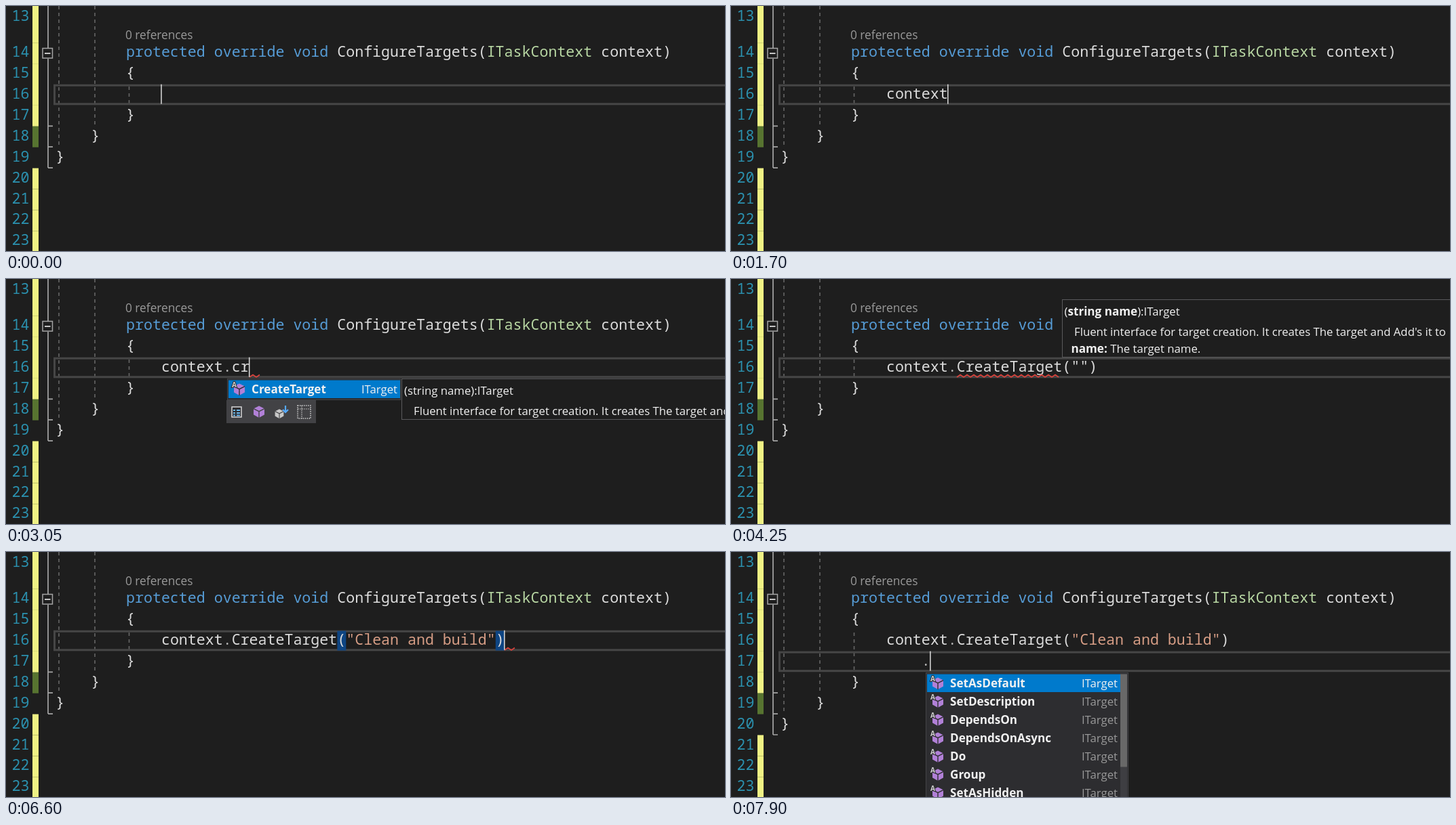
These frames come from a looping animation (1060x362 px, 8000 ms). An HTML page:

```html
<!DOCTYPE html>
<html lang="en">
<head>
<meta charset="utf-8">
<title>Editor typing</title>
<style>
html, body { margin: 0; width: 100%; height: 100%; overflow: hidden; background: #1e1e1e; }
svg { display: block; }
text { white-space: pre; }
.code { font: 21.62px "Noto Sans Mono", monospace; fill: #dcdcdc; }
.ui { font: 16.75px "Open Sans", sans-serif; fill: #f1f1f1; }
.bold { font-weight: 700; font-size: 17.1px; }
.lens { font-size: 17.3px; fill: #999; }
</style>
</head>
<body>
<svg id="stage" width="1060" height="362" viewBox="0 0 1060 362"></svg>
<script>
const LOOP = 8000, PITCH = 30.9, CHAR = 12.97, COL0 = 73.3;
const stage = document.getElementById('stage');

const colX = c => COL0 + c * CHAR;
const rowY = n => n < 14 ? 0 : 116 + (n - 16) * PITCH;
const baseY = n => n < 14 ? 22 : 75.2 + (n - 14) * PITCH;
const esc = s => s.replace(/&/g, '&amp;').replace(/</g, '&lt;').replace(/>/g, '&gt;');
const rect = (x, y, w, h, fill, more = '') =>
  `<rect x="${x}" y="${y}" width="${w}" height="${h}" fill="${fill}" ${more}/>`;
const path = (d, stroke, w = 1.5, more = 'fill="none"') =>
  `<path d="${d}" stroke="${stroke}" stroke-width="${w}" ${more}/>`;
const shape = (d, fill) => `<path d="${d}" fill="${fill}"/>`;
const span = (s, fill) => `<tspan fill="${fill}">${esc(s)}</tspan>`;
const label = (x, y, cls, inner, more = '') =>
  `<text x="${x}" y="${y}" class="${cls}" ${more}>${inner}</text>`;
const ui = (x, y, s, bold) => label(x, y, bold ? 'ui bold' : 'ui', esc(s));
const code = (col, row, inner) => label(colX(col), baseY(row), 'code', inner);
const at = (x, y, inner) => `<g transform="translate(${x} ${y})">${inner}</g>`;

// Completion icons, centred on 0,0
const cube = (c = '#b180d7', gap = '#2d2d30') =>
  shape('M0-8.5L8-4.5V4.5L0 9L-8 4.5V-4.5Z', c) +
  path('M-8-4.3L0-.3L8-4.3M0 0V9', gap, 1.4);
const capA = '<text x="-11" y="-2" font-family="Open Sans, sans-serif" font-size="10" ' +
  'font-weight="700" fill="#d0d0d0" stroke="#2d2d30" stroke-width="2" paint-order="stroke">A</text>';
const page = rect(-7, -7, 14, 15, '#2d2d30', 'stroke="#d8d8d8" stroke-width="1.5"') +
  path('M-5-2H-2M0-2H5M-5 2H-2M0 2H5M-5 5.5H-2M0 5.5H5', '#6cb8f0', 2);
const classMark = path('M-4-3H4M0-3V5H4', '#c5c5c5') +
  shape('M-10-3L-4-9L1-5L-5 2ZM2-3L6-7L10-3L6 1ZM2 5L6 1L10 5L6 9Z', '#e8ab53');
const key = c => `<circle cx="-4" r="3" fill="none" stroke="${c}" stroke-width="2"/>` +
  path('M-1 0H7V3M4 0V3', c, 2);
const icons = {
  method: () => at(0, 1, cube()) + capA,
  prop: () => at(1, 0, page) + path('M2-7H8M5-10L8-7L5-4', '#8fce8f', 1.8) + capA,
  guarded: () => at(1, -1, cube()) +
    '<circle cx="-7" cy="4" r="2.6" fill="#2d2d30" stroke="#d0d0d0" stroke-width="1.5"/>' +
    path('M-7 6.5V11H-4', '#d0d0d0'),
  param: () => path('M-7-8Q-13 0-7 8M7-8Q13 0 7 8', '#f1f1f1', 2) +
    `<g transform="scale(.62)">${cube('#e0e0e0', '#333')}</g>`,
  keyword: () => '<circle r="10" fill="#c8c8c8"/>' + key('#2d2d30'),
  class: () => classMark,
  seen: () => classMark + rect(5, 5, 5, 5, '#d0d0d0'),
  delegate: () => rect(-8, -4, 16, 11, '#b180d7') +
    path('M-3-4V-7H3V-4', '#b180d7', 2) + path('M-8 1H8', '#2d2d30', 1.4)
};

// Lists: rows are [icon, name, type, bold]
const m = (name, type) => ['method', name, type, 1];
const LISTS = {
  start: { x: 222, r: 631, y: 147, thumb: 28, rows: [
    ['param', 'context', 'ITaskContext'], ['keyword', 'const', '', 1],
    ['guarded', 'ConfigureBuildProperties', 'void', 1], ['guarded', 'ConfigureTargets', 'void', 1],
    ['class', 'CommandArguments', ''], ['delegate', 'Comparison<>', ''],
    ['seen', 'Console', ''], ['class', 'ConsoleCancelEventArgs', '']] },
  members: { x: 327, r: 794, y: 147, thumb: 174, rows: [
    ['prop', 'Properties', 'IBuildPropertiesSession'],
    ['prop', 'ScriptArgs', 'DictionaryWithDefault<string,string>'],
    m('CreateTarget', 'ITarget'), m('Tasks', 'ITaskFluentInterface'),
    m('BuildSystems', 'IBuildSystem'), m('CoreTasks', 'ICoreTaskFluentInterface'),
    m('LogError', 'void'), m('LogInfo', 'void')] },
  some: { x: 327, r: 695, y: 147, rows: [m('CreateTarget', 'ITarget'),
    m('CoreTasks', 'ICoreTaskFluentInterface'), m('DecreaseDepth', 'void')] },
  one: { x: 327, r: 581, y: 147, rows: [m('CreateTarget', 'ITarget')] },
  target: { x: 288, r: 585, y: 178, thumb: 137, rows: ['SetAsDefault', 'SetDescription', 'DependsOn',
    'DependsOnAsync', 'Do', 'Group', 'SetAsHidden'].map(n => m(n, 'ITarget')) }
};

function popup(s) {
  const { x, r, y, thumb, rows } = LISTS[s.list];
  const h = thumb ? 230 : rows.length * 27 + 4;
  const end = thumb ? r - 11 : r;
  let out = rect(x - .5, y + .5, r - x + 1, h, '#2d2d30', 'stroke="#434346"');
  out += rect(x + 1, y + 2.5, end - x - 1, 26.5, '#007acc');
  if (thumb) out += rect(end, y + 2, 10, h, '#3e3e42') + rect(end, y + 2.5, 10, thumb, '#686868');
  rows.forEach(([icon, name, type, bold], i) => {
    const cy = y + 16 + i * 27;
    const n = i && /^c/i.test(name) ? s.match : 0;
    out += at(x + 17, cy - 1, icons[icon]());
    out += label(x + 35, cy + 6, bold ? 'ui bold' : 'ui', span(name.slice(0, n), '#b0a4f4') + esc(name.slice(n)));
    out += label(r - (thumb ? 15 : 4), cy + 6, 'ui', span(type, i ? '#999' : '#f1f1f1'), 'text-anchor="end"');
  });
  return thumb ? out : out + filterBar(y + h);
}

function filterBar(y) {
  const cy = y + 18;
  return rect(325, y + 1, 132, 34, '#424245') +
    at(340, cy, page) + at(373, cy, cube('#b180d7', '#424245')) +
    at(403, cy + 3, `<g transform="scale(.8)">${cube('#c8c8c8', '#424245')}</g>`) +
    path(`M412 ${cy - 9}V${cy + 1}M408 ${cy - 3}L412 ${cy + 1}L416 ${cy - 3}`, '#55aaff', 2.2) +
    rect(430, cy - 9, 19, 19, 'none', 'stroke="#d0d0d0" stroke-width="1.5" stroke-dasharray="1.5 1.5"') +
    path(`M430 ${cy - 4}H449M436 ${cy - 9}V${cy + 10}`, '#d0d0d0', 1.2, 'stroke-dasharray="1.5 1.5"');
}

const ABOUT = "Fluent interface for target creation. It creates The target and Add's it to";
const frame = (x, y, h) => rect(x + .5, y + .5, 600, h, '#1e1e1e', 'stroke="#5a5a5c"');
const tips = {
  item: () => frame(583, 147, 60) + ui(587, 171, '(string name):ITarget') + ui(601, 201, ABOUT),
  call: () => frame(488, 30, 85) +
    label(491.5, 54, 'ui', '(<tspan class="bold">string name</tspan>):ITarget') +
    ui(506, 84, ABOUT) +
    label(501.5, 109, 'ui', '<tspan class="bold">name:</tspan> The target name.')
};

function squiggle([x, end]) {
  let d = `M${x} 145`;
  for (let i = 1; x + i * 5 <= end; i++) d += `l5 ${i % 2 ? -3.5 : 3.5}`;
  return path(d, '#d8423c', 1.6, 'fill="none" stroke-linejoin="round"');
}

function margin(nl) {
  let out = '';
  for (let n = 13; n <= 23; n++) {
    const k = n - nl;
    const fill = k === 18 ? '#577430' : k === 19 ? '' : '#eff284';
    const y = rowY(n);
    if (fill) out += rect(39, y, 9, rowY(n + 1) - y, fill);
    out += label(8.5, baseY(n), 'code', span(String(n), '#2b91af'));
  }
  const ends = [18, 19, 20].map(n => rowY(n + nl) - .5);
  out += path(`M62 0V62M62 78V${ends[2]}` + ends.map(y => `M62 ${y}H69`).join(''), '#a5a5a5', 1.7);
  out += rect(54, 62.5, 14.5, 14.5, '#1e1e1e', 'stroke="#a5a5a5" stroke-width="1.5"') +
    path('M57 70H65.5', '#d8d8d8', 1.8);
  const guide = (x, y, end) => path(`M${x} ${y}V${end}`, '#666', 1.6, 'stroke-dasharray="5 5"');
  return out + guide(78, 0, ends[1] - 2) + guide(131, 0, ends[0] - 2) + guide(181.5, 119, rowY(17 + nl) - 1);
}

const tint = s => s.text.split(/(\.|".*")/).map(p =>
  span(p, p === '.' ? '#b4b4b4' : p[0] === '"' && s.str ? '#d69d85' : '#dcdcdc')).join('');

function draw(s) {
  const nl = s.nl, row = 16 + nl, top = rowY(row);
  let out = margin(nl);
  out += rect(71.5, top + 1.2, 1000, 27.6, 'none', 'stroke="#464646" stroke-width="3"');
  out += label(176, 49, 'ui lens', s.lens + ' references');
  out += code(8, 14, span('protected override void ', '#569cd6') + 'ConfigureTargets(' +
    span('ITaskContext', '#b8d7a3') + ' context)');
  out += code(8, 15, '{') + code(8, 17 + nl, '}') + code(4, 18 + nl, '}') + code(0, 19 + nl, '}');
  if (s.pair) for (const c of [32, 50]) out += rect(colX(c), 116.5, CHAR, 29, '#0e4583');
  out += code(12, 16, tint(s));
  if (s.dot) out += code(16, 17, span('.', '#b4b4b4'));
  out += s.wavy.map(squiggle).join('');
  if (s.caret) out += rect(colX(s.col) - .7, top - .3, 1.5, 29, '#dcdcdc');
  if (s.list) out += popup(s);
  if (s.tip) out += tips[s.tip]();
  stage.innerHTML = out;
}

const CALL = 'context.CreateTarget';
const steps = [
  [0, { text: '', col: 12, caret: 1, nl: 0, lens: '0', wavy: [], list: '', tip: '', match: 0, str: 0, pair: 0, dot: 0 }],
  [500, { caret: 0 }],
  [750, { text: 'c', col: 13, caret: 1 }],
  [900, { list: 'start', match: 1 }],
  [1000, { text: 'co', col: 14 }],
  [1100, { match: 2 }],
  [1400, { text: 'context', col: 19, list: '' }],
  [1600, { caret: 0 }],
  [1700, { caret: 1 }],
  [2100, { text: 'context.', col: 20, caret: 0, wavy: [[229, 254], [333, 351]] }],
  [2250, { list: 'members' }],
  [2400, { text: 'context.c', col: 21, caret: 1, list: 'some', match: 1, lens: '-', wavy: [[346, 363]] }],
  [2550, { text: 'context.cr', col: 22, list: 'one', lens: '0', wavy: [[359, 376]] }],
  [2700, { caret: 0 }],
  [2850, { caret: 1 }],
  [3050, { tip: 'item' }],
  [3200, { text: CALL, col: 32, list: '', tip: '', wavy: [] }],
  [3300, { text: CALL + '()', col: 33, tip: 'call' }],
  [3550, { caret: 0 }],
  [3600, { lens: '-' }],
  [3700, { lens: '0', caret: 1 }],
  [4250, { text: CALL + '("")', col: 34, caret: 0, wavy: [[333, 487]] }],
  [4350, { caret: 1 }],
  [4600, { str: 1 }],
  [4800, { caret: 0 }],
  [5300, { text: CALL + '("Clean and build")', col: 49, caret: 1, wavy: [] }],
  [5400, { lens: '-' }],
  [5450, { lens: '0', wavy: [[735, 752]] }],
  [5850, { caret: 0 }],
  [6150, { col: 50, caret: 1 }],
  [6300, { col: 51, tip: '' }],
  [6400, { pair: 1 }],
  [6700, { nl: 1, col: 16, pair: 0, wavy: [] }],
  [7450, { caret: 0 }],
  [7600, { dot: 1, col: 17, caret: 1 }],
  [7700, { lens: '-' }],
  [7800, { list: 'target', match: 0 }],
  [7900, { lens: '0' }]
];

let shown = -1;
function tick() {
  const t = performance.now() % LOOP;
  const past = steps.filter(([start]) => start <= t);
  if (past.length !== shown) {
    shown = past.length;
    draw(Object.assign({}, ...past.map(p => p[1])));
  }
  requestAnimationFrame(tick);
}
tick();
</script>
</body>
</html>
```
